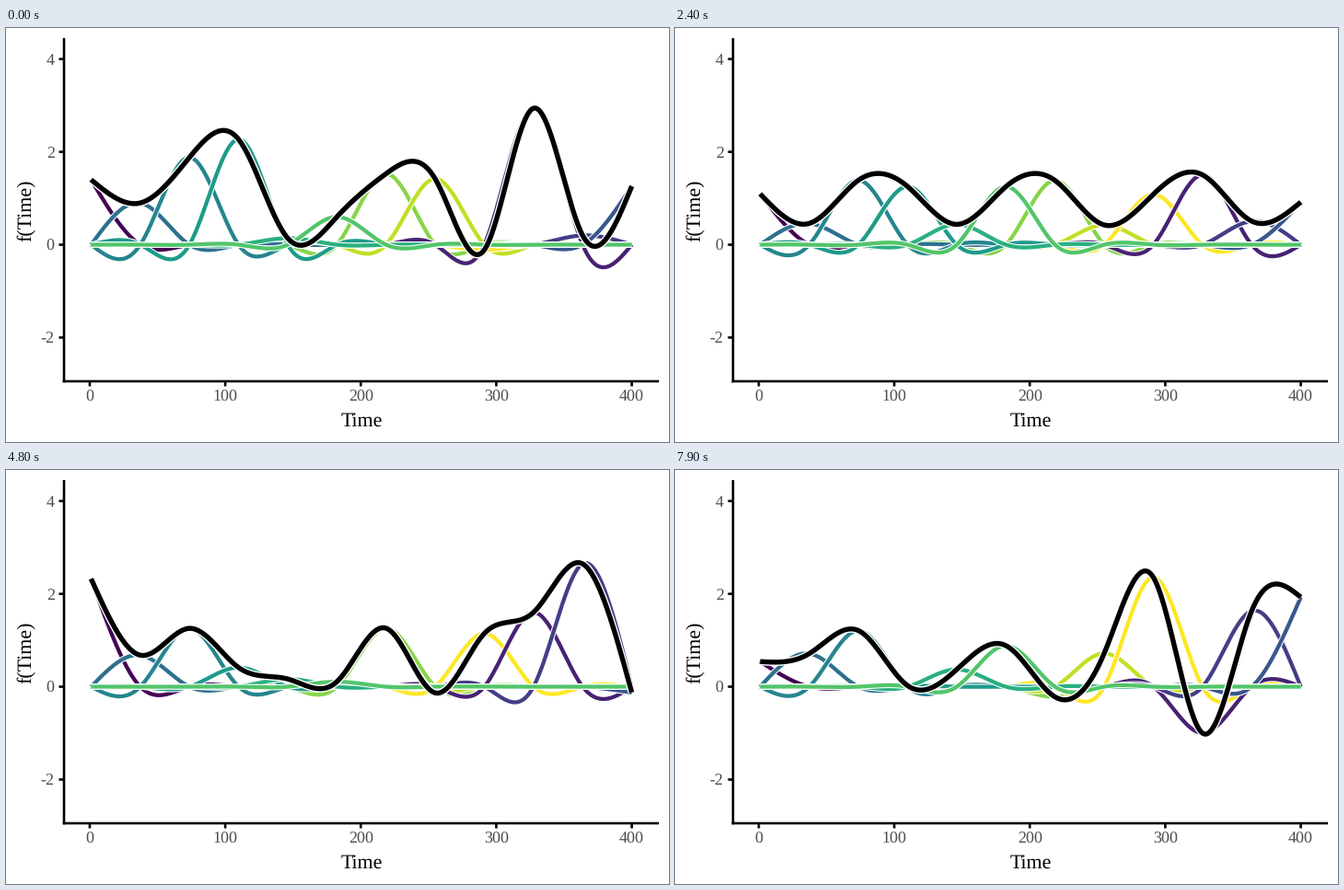
These frames come from a looping animation (720 px wide and 450 px high, 8000 ms). A matplotlib script:

```python
import numpy as np
import matplotlib.pyplot as plt
from matplotlib.animation import FuncAnimation
from matplotlib.patheffects import Normal, Stroke

WIDTH, HEIGHT = 720, 450
FRAMES, INTERVAL, STEP = 80, 100, 10
KNOTS = 12


def wave(phase):
    return 1 + 0.6 * np.sin(2 * np.arange(KNOTS) + phase)


# Heights of the black curve at its knots, one row per resting state.
STATES = np.array([
    [1.40, 0.90, 1.88, 2.27, 0.14, 0.60, 1.53, 1.42, -0.11, 2.94, 0.20, 1.26],
    [2.11, -0.41, 0.37, 1.89, -0.48, 0.66, 0.59, -0.85, 2.09, 1.15, 1.23, 0.72],
    wave(3),
    [1.96, 3.33, 0.96, 1.86, 3.71, 1.15, 0.87, 0.62, 0.78, 1.79, 1.83, 0.66],
    wave(0),
    [2.46, 0.59, 1.33, 0.37, 0.02, 0.05, 1.32, -0.31, 1.18, 1.71, 2.76, -0.24],
    [0.21, 1.40, 1.27, 0.86, 2.42, 2.67, 0.40, 1.63, -0.03, 0.25, 1.13, 1.44],
    [2.36, 0.12, 0.33, 1.12, -0.31, -0.27, 1.47, 3.17, 1.27, -0.14, 0.96, 1.84],
    [0.52, 0.72, 1.22, 0.01, 0.38, 0.90, -0.24, 0.69, 2.37, -1.01, 1.64, 1.93],
])


def px(time):
    return 90.95 + 1.4716 * np.asarray(time)


def py(value):
    return 235.55 - 50.45 * np.asarray(value)


def natural_basis(time, count):
    """Columns are natural cubic splines that equal 1 at one knot, 0 at the rest."""
    u = (time - time[0]) / (time[-1] - time[0]) * (count - 1)
    left = np.minimum(u.astype(int), count - 2)
    b = (u - left)[:, None]
    a = 1 - b
    eye = np.eye(count)
    system, second = eye.copy(), np.zeros((count, count))
    for i in range(1, count - 1):
        system[i, i - 1:i + 2] = 1, 4, 1
        second[i, i - 1:i + 2] = 6, -12, 6
    curv = np.linalg.solve(system, second)
    return (a * eye[left] + b * eye[left + 1]
            + ((a**3 - a) * curv[left] + (b**3 - b) * curv[left + 1]) / 6)


def ease(p):
    return 4 * p**3 if p < 0.5 else 1 - 4 * (1 - p)**3


def weights(frame):
    state, phase = divmod(frame, STEP)
    start = 2 if state == 0 else 3
    p = ease(max(0, phase - start) / (STEP - start))
    return STATES[state] * (1 - p) + STATES[state + 1] * p


plt.rcParams.update({"font.family": "Liberation Serif", "text.hinting": "no_hinting",
                     "text.hinting_factor": 1})
# At 72 dpi one point is one pixel.
fig = plt.figure(figsize=(WIDTH / 72, HEIGHT / 72), dpi=72, facecolor="white")
ax = fig.add_axes([0, 0, 1, 1])
ax.set(xlim=(0, WIDTH), ylim=(HEIGHT, 0))
ax.axis("off")


def rule(xs, ys):
    ax.plot(xs, ys, color="black", lw=2.6, solid_capstyle="butt", snap=False)


def label(x, y, text, size, color, ha="center", rotation=0):
    ax.text(x, y, text, size=size, color=color, ha=ha, va="baseline",
            rotation=rotation, rotation_mode="anchor")


def bordered_line(color, width):
    halo = [Stroke(linewidth=width * 1.5, foreground="white"), Normal()]
    line, = ax.plot([], [], color=color, lw=width, solid_capstyle="butt",
                    path_effects=halo, snap=False)
    return line


rule([63, 63], [11, 385.3])
rule([61.7, 709], [384, 384])
for tick in range(0, 401, 100):
    rule([px(tick)] * 2, [384, 389.5])
    label(px(tick), 406, str(tick), 17.6, "#4D4D4D")
for tick in range(-2, 5, 2):
    rule([57.5, 63], [py(tick)] * 2)
    label(52.8, py(tick) + 6, str(tick), 17.6, "#4D4D4D", ha="right")
label(386, 433, "Time", 22, "black")
label(28, 198, "f(Time)", 22, "black", rotation=90)

time = np.arange(1, 401)
basis = natural_basis(time, KNOTS)

# Both colours and stacking follow alphabetical sorting of the numbers.
by_name = sorted(range(KNOTS), key=lambda k: str(k + 1))
stacking = [by_name[i] for i in by_name]
viridis = plt.get_cmap("viridis")
curves = {k: bordered_line(viridis(by_name.index(k) / (KNOTS - 1)), 4.27)
          for k in stacking}
total = bordered_line("black", 5.4)


def update(frame):
    w = weights(frame)
    for k, line in curves.items():
        line.set_data(px(time), py(basis[:, k] * w[k]))
    total.set_data(px(time), py(basis @ w))
    return [*curves.values(), total]


animation = FuncAnimation(fig, update, frames=FRAMES, interval=INTERVAL,
                          repeat=True, repeat_delay=0, blit=False)
plt.show()
```
